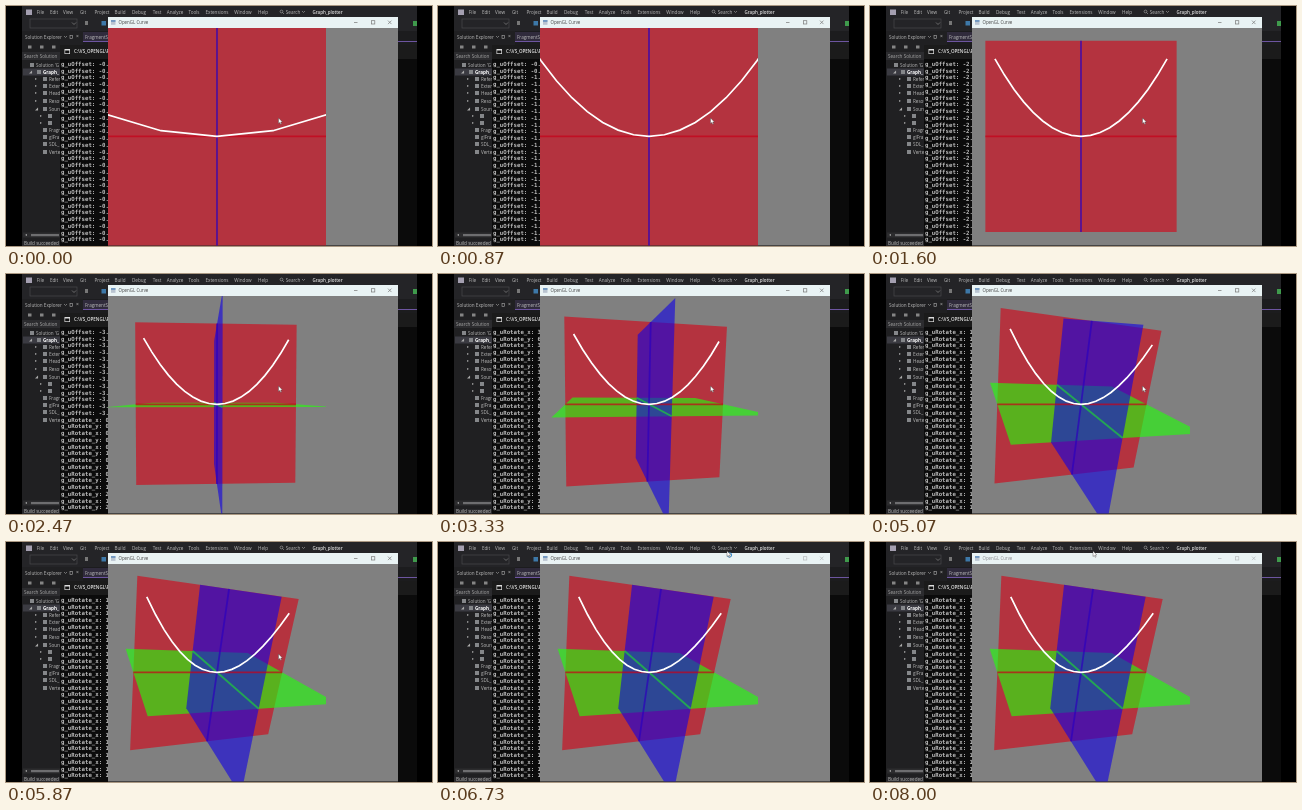
An HTML page with a canvas for the animation above (8070 ms loop, 426 by 240 pixels).

```html
<!DOCTYPE html>
<html>
<head>
<meta charset="utf-8">
<style>
html, body { margin: 0; height: 100%; overflow: hidden; background: #000; }
canvas { display: block; width: 426px; height: 240px; }
</style>
</head>
<body>
<canvas id="stage" width="426" height="240"></canvas>
<script>
const ctx = document.getElementById('stage').getContext('2d');
const LOOP = 8070, STEP = LOOP / 121;
const SANS = '"Open Sans", "Noto Sans", sans-serif';
const MONO = '"DejaVu Sans Mono", monospace';

// Keyframes: [time, value] pairs, linear between them
const DISTANCE = [[0, .47], [1600, 2.75], [1970, 3.28]];
const TILT = [[2200, 0], [3330, 6], [4400, 11], [5070, 18], [5250, 19.6]];
const TURN = [[2200, 0], [3330, 11.5], [4400, 22.2], [5070, 23.6], [5250, 24]];
const MOUSE_X = [[5900, 272.5], [6550, 289], [7250, 289], [7850, 223]];
const MOUSE_Y = [[5900, 112], [6550, 9], [7250, 9], [7850, 9]];

function at(keys, t) {
  if (t <= keys[0][0]) return keys[0][1];
  for (let i = 1; i < keys.length; i++) {
    const [t0, v0] = keys[i - 1], [t1, v1] = keys[i];
    if (t < t1) return v0 + (v1 - v0) * (t - t0) / (t1 - t0);
  }
  return keys[keys.length - 1][1];
}

function rect(x, y, w, h, color) {
  ctx.fillStyle = color;
  ctx.fillRect(x, y, w, h);
}

function text(s, x, y, size = 4.6, color = '#bcbcbc', align = 'left', font = SANS, weight = '') {
  ctx.font = `${weight} ${size}px ${font}`;
  ctx.fillStyle = color;
  ctx.textAlign = align;
  ctx.textBaseline = 'middle';
  ctx.fillText(s, x, y);
}

function trace(points) {
  ctx.beginPath();
  points.forEach(p => ctx.lineTo(...p));
}

function line(points, color, width) {
  trace(points);
  ctx.strokeStyle = color;
  ctx.lineWidth = width;
  ctx.stroke();
}

function ring(x, y, r, color, width = 1) {
  ctx.beginPath();
  ctx.arc(x, y, r, 0, 7);
  ctx.strokeStyle = color;
  ctx.lineWidth = width;
  ctx.stroke();
}

function ide() {
  rect(0, 0, 426, 240, '#000');
  rect(16, 0, 395, 240, '#1c1c1e');
  rect(16, 0, 395, 25, '#242427');
  rect(20, 3.5, 6, 5.5, '#a49fb0');
  const menu = [['File', 34.5], ['Edit', 48], ['View', 62], ['Git', 77], ['Project', 96], ['Build', 114],
    ['Debug', 133], ['Test', 151], ['Analyze', 169], ['Tools', 188], ['Extensions', 211],
    ['Window', 237], ['Help', 257], ['Search', 287]];
  menu.forEach(([s, x]) => text(s, x, 6.5, 4.6, '#bcbcbc', 'center'));
  ring(275.5, 5.5, 1.4, '#aaa', .6);
  line([[276.5, 6.5], [278, 8]], '#aaa', .6);
  line([[296, 5], [297.5, 6.5], [299, 5]], '#aaa', .6);
  text('Graph_plotter', 321.5, 6.5, 4.5, '#e0e0e0', 'center', SANS, 600);

  ctx.strokeStyle = '#48484b';
  ctx.lineWidth = .7;
  ctx.strokeRect(24, 13, 47, 9);
  line([[66, 16.5], [68, 18.5], [70, 16.5]], '#999', .6);
  rect(79, 15, 3, 4, '#777');
  rect(95.5, 15, 4.5, 4.5, '#3d78a8');
  rect(407, 15, 4, 5, '#3f9a4c');

  // Solution panel
  rect(16, 25, 61, 215, '#202022');
  text('Solution Explorer', 19, 31.3);
  line([[58, 30], [59.5, 31.5], [61, 30]], '#aaa', .6);
  ctx.strokeRect(64, 29.5, 2.5, 3);
  text('×', 70, 31, 5);
  [22, 34, 46].forEach(x => rect(x, 39.5, 3.5, 3, '#858585'));
  rect(16, 46, 38, 8, '#2c2c2f');
  text('Search Solution', 18, 50.3, 4.6, '#a8a8a8');
  rect(17, 62.5, 37, 7, '#3b3b42');
  const tree = [['Solution \'G', 30, 59], ['Graph_', 37, 66], ['Refere', 43, 73], ['Extern', 43, 80],
    ['Heade', 43, 87], ['Resour', 43, 95], ['Source', 43, 103], ['', 48, 110], ['', 48, 117],
    ['Fragm', 43, 124], ['glFra', 43, 131], ['SDL_', 43, 138], ['Vertex', 43, 146]];
  tree.forEach(([s, x, y], i) => {
    rect(x - 6, y - 2, 4, 4, '#85878a');
    if (i && i < 9) text(i === 1 || i === 6 ? '◢' : '▸', x - 14, y, 4, '#aaa');
    text(s, x, y + .3, 4.6, i === 1 ? '#fff' : '#bcbcbc', 'left', SANS, i === 1 ? 'bold' : '');
  });
  rect(17, 226.5, 37, 5, '#2c2c2e');
  rect(25, 228, 28, 2.2, '#6e6e70');
  text('◂', 19, 229, 4, '#aaa');
  rect(77, 26, 25, 9, '#302b3c');
  text('FragmentSh', 79, 31.3);
  rect(77, 35, 334, 1, '#6d55a0');
  rect(16, 235, 38, 5, '#28282b');
  text('Build succeeded', 18, 238.2);
}

function consoleWindow(t) {
  rect(54, 39, 357, 201, '#0b0b0b');
  rect(54, 39, 357, 14, '#1b1b1b');
  rect(58.5, 43, 5.5, 5, '#ddd');
  rect(59.2, 44.5, 4.1, 2.8, '#111');
  text('C:\\VS_OPENGL\\P', 68, 46, 4.5, '#e6e6e6', 'left', SANS, 600);
  const last = Math.floor(Math.min(t, 5320) / 20);
  for (let row = 0; row < 27; row++) {
    const n = last - 26 + row, when = n * 20;
    let s = `g_uOffset: -${at(DISTANCE, when).toFixed(3)}`;
    if (when >= 2200) {
      s = when < 4450 && n % 2
        ? `g_uRotate_y: ${at(TURN, when).toFixed(1)}`
        : `g_uRotate_x: ${at(TILT, when).toFixed(1)}`;
    }
    text(s, 55, 58.3 + row * 6.75, 5.7, '#bdbdbd', 'left', MONO, 'bold');
  }
}

function scene(t) {
  const a = at(TILT, t) * Math.PI / 180, b = at(TURN, t) * Math.PI / 180, d = at(DISTANCE, t);
  const sa = Math.sin(a), ca = Math.cos(a), sb = Math.sin(b), cb = Math.cos(b);
  const project = ([x, y, z]) => {
    const y1 = y * ca - z * sa, z1 = y * sa + z * ca;
    const k = 263.1 / (d - (z1 * cb - x * sb));
    return [211 + k * (x * cb + z1 * sb), 130.3 - k * y1];
  };
  const square = [[-1, -1], [1, -1], [1, 1], [-1, 1]];
  const plane = (place, color) => {
    trace(square.map(([u, v]) => project(place(u, v))));
    ctx.fillStyle = color;
    ctx.fill();
  };
  const axis = (x, y, z, color) =>
    line([[-x, -y, -z], [x, y, z]].map(project), color, 1.8);

  ctx.save();
  ctx.beginPath();
  ctx.rect(102, 22, 218, 217.5);
  ctx.clip();
  plane((u, v) => [u, v, 0], 'rgba(215,0,20,.6)');
  plane((u, v) => [u, 0, v], 'rgba(35,255,10,.62)');
  plane((u, v) => [0, u, v], 'rgba(18,0,228,.6)');
  axis(1, 0, 0, 'rgba(200,0,25,.7)');
  axis(0, 0, 1, 'rgba(30,215,50,.65)');
  axis(0, 1, 0, 'rgba(45,0,190,.7)');
  const curve = Array.from({ length: 19 }, (_, i) => {
    const x = (i - 9) / 10;
    return project([x, x * x, 0]);
  });
  line(curve, '#fff', 1.7);
  ctx.restore();
}

function glWindow(t) {
  const ink = t > 7500 ? '#8c8c90' : '#444', icon = t > 6500 ? '#b4b8ba' : '#777';
  rect(102, 11, 290, 228.5, '#808080');
  rect(102, 11, 290, 11, '#e9f3f4');
  rect(105, 14.3, 4.5, 4.5, '#b9c4d0');
  rect(105, 14.3, 4.5, 1.3, '#4f82b8');
  text('OpenGL Curve', 112.5, 16.8, 4.4, ink);
  line([[348, 16.5], [351.5, 16.5]], icon, .7);
  ctx.strokeStyle = icon;
  ctx.strokeRect(365.5, 14.7, 3.3, 3.3);
  line([[382, 14.6], [385.5, 18.1]], icon, .7);
  line([[385.5, 14.6], [382, 18.1]], icon, .7);
  scene(t);
}

function pointer(t) {
  const x = at(MOUSE_X, t), y = at(MOUSE_Y, t);
  if (t > 4300 && t < 4500) ring(x + 5, y, 1.8, '#3a8fd0');
  if (t > 6600 && t < 7000) ring(x + 2.5, y + 4, 2.2, '#3a8fd0');
  trace([[0, 0], [0, 5.5], [1.3, 4.4], [2.2, 6.3], [3.1, 5.9], [2.2, 4], [3.9, 3.9]]
    .map(([u, v]) => [x + u, y + v]));
  ctx.closePath();
  ctx.fillStyle = '#fff';
  ctx.fill();
  ctx.strokeStyle = '#444';
  ctx.lineWidth = .4;
  ctx.stroke();
}

const start = performance.now();
function draw() {
  const now = (performance.now() - start) % LOOP;
  const t = Math.floor((now + 5) / STEP) % 121 * STEP;
  ide();
  consoleWindow(t);
  glWindow(t);
  pointer(t);
  requestAnimationFrame(draw);
}
draw();
</script>
</body>
</html>
```
